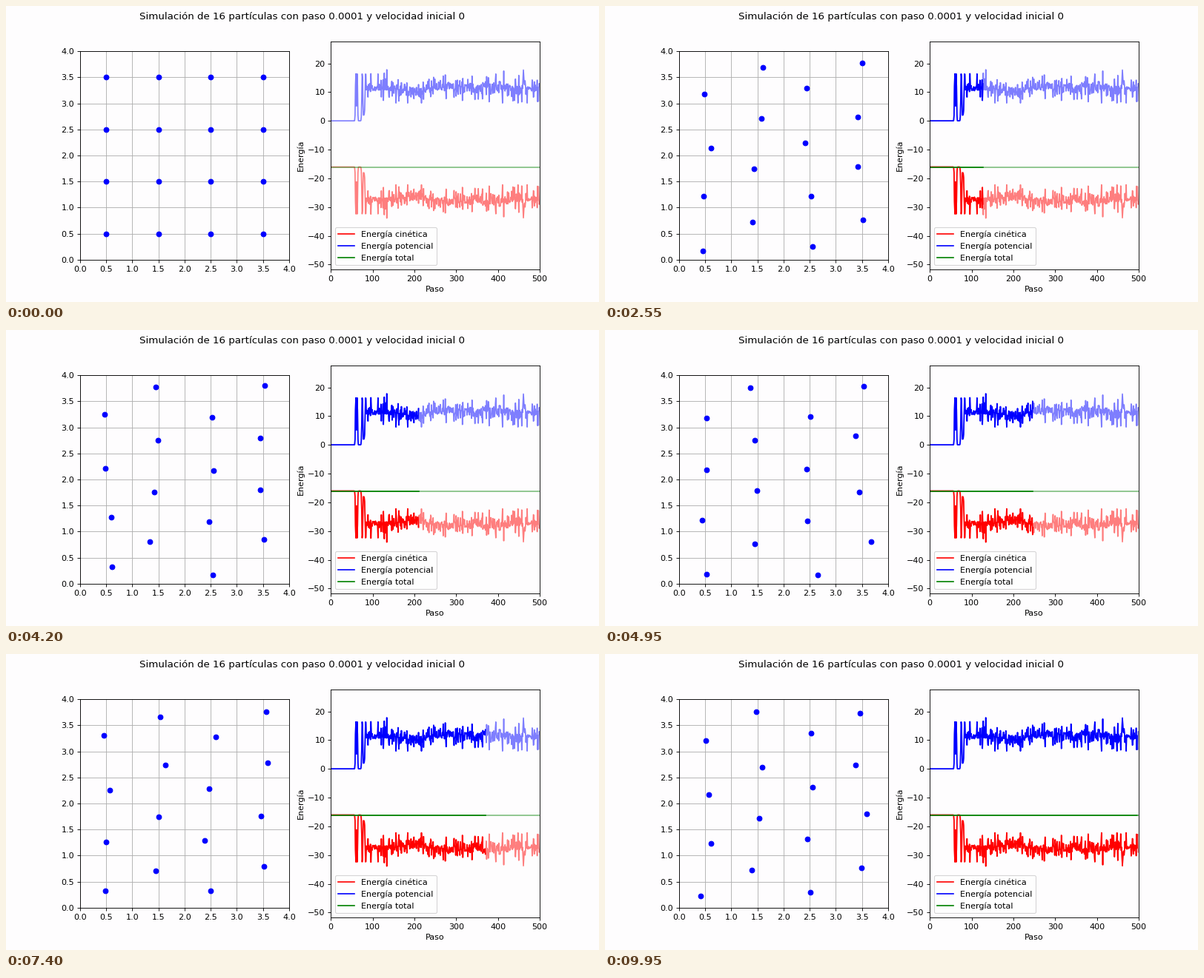
A matplotlib script for the animation above (10 s loop, 800 px wide and 400 px high).

```python
import numpy as np
import matplotlib.pyplot as plt
from matplotlib.animation import FuncAnimation

FRAMES, INTERVAL = 200, 50
STEPS = 500
STEPS_PER_FRAME = STEPS / FRAMES
TOTAL_ENERGY = -16.05
BACKGROUND = "#fefdfe"

rng = np.random.default_rng(16)


def bump(step, center, width):
    return np.exp(-((step - center) / width) ** 2)


def rise(step, center, width):
    return 1 / (1 + np.exp((center - step) / width))


# Energies: quiet start, two double bursts, then thermal noise.
steps = np.arange(STEPS + 1)
bursts = 17.5 * (bump(steps, 59.7, 1.15) + bump(steps, 63.3, 1.15)
                 + bump(steps, 75.4, 1.5) + bump(steps, 83.5, 1.8))
bursts += 2 * bump(steps, 79.5, 2)
noise = np.clip(rng.laplace(11.3, 1.4, STEPS + 1), 6.2, 17.8)
upper = np.where(steps < 85, bursts, noise)
lower = TOTAL_ENERGY - upper
total = np.full(STEPS + 1, TOTAL_ENERGY)

# Particles: a square lattice whose columns slide into a hexagonal one.
col, row = np.divmod(np.arange(16), 4)
lattice_x, lattice_y = col + 0.5, row + 0.5
slide = np.where(col % 2, 0.25, -0.25)


def vibration(count, rms, waves=3):
    """Return a function of the step that gives `count` seeded wobbles."""
    omega = rng.uniform(0.3, 0.95, (waves, count))
    phase = rng.uniform(0, 2 * np.pi, (waves, count))
    size = rms * np.sqrt(2 / waves)
    return lambda step: size * np.sin(omega * step + phase).sum(axis=0)


sway_x = vibration(16, 0.075)
sway_y = vibration(16, 0.03)
column_sway = vibration(4, 0.05)


def positions(step):
    amount = 1.4 * bump(step, 61.5, 3) + rise(step, 75, 0.8)
    heat = rise(step, 78, 1.6)
    x = lattice_x + heat * sway_x(step)
    y = lattice_y + amount * slide + heat * (sway_y(step) + column_sway(step)[col])
    return x, y


fig, (box, plot) = plt.subplots(1, 2, figsize=(10, 5), dpi=80, facecolor=BACKGROUND)
fig.suptitle("Simulación de 16 partículas con paso 0.0001 y velocidad inicial 0")

box.set(xlim=(0, 4), ylim=(0, 4), aspect="equal", facecolor=BACKGROUND,
        xticks=np.arange(0, 4.1, 0.5), yticks=np.arange(0, 4.1, 0.5))
box.grid()
dots, = box.plot([], [], "bo")

plot.set(xlim=(0, STEPS), ylim=(-51.7, 27.6), facecolor=BACKGROUND,
         xlabel="Paso", ylabel="Energía",
         xticks=range(0, 501, 100), yticks=range(-50, 21, 10))
series = [(lower, "red", "Energía cinética"),
          (upper, "blue", "Energía potencial"),
          (total, "green", "Energía total")]
for values, color, _ in series:
    plot.plot(steps, values, color=color, alpha=0.5)
traces = [plot.plot([], [], color=color, label=label)[0]
          for _, color, label in series]
plot.legend(loc="lower left")


def update(frame):
    step = frame * STEPS_PER_FRAME
    dots.set_data(*positions(step))
    shown = int(step) + 1
    for trace, (values, _, _) in zip(traces, series):
        trace.set_data(steps[:shown], values[:shown])
    return [dots, *traces]


anim = FuncAnimation(fig, update, frames=FRAMES, interval=INTERVAL,
                     init_func=lambda: update(0), repeat=True, repeat_delay=0)
plt.show()
```
